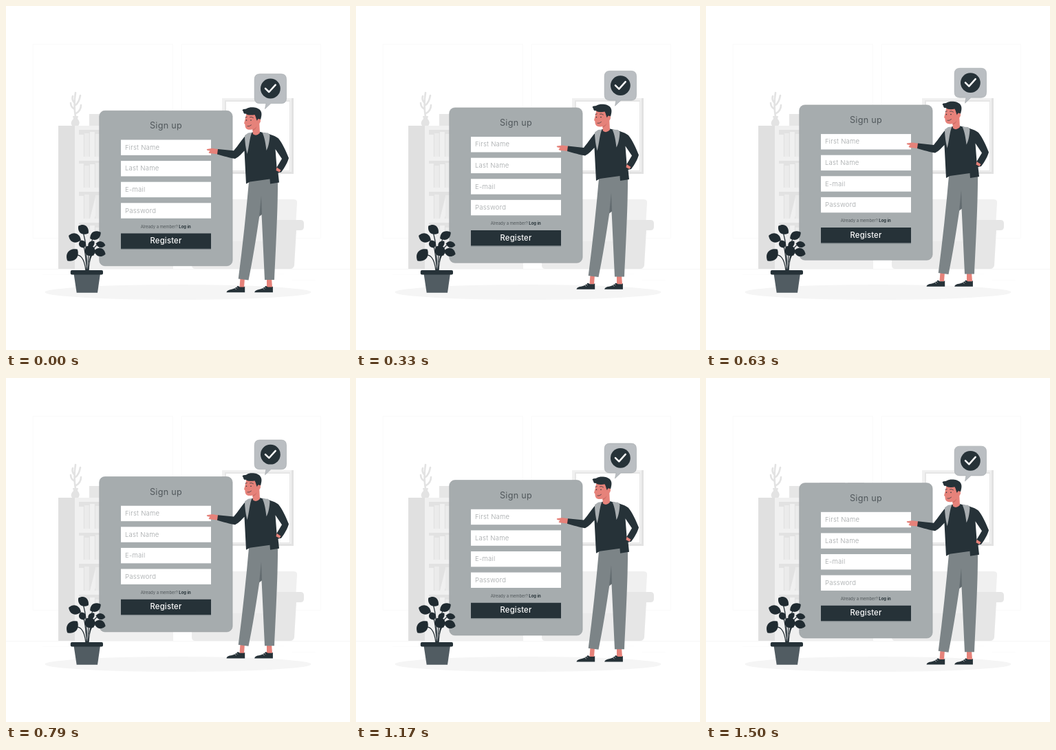
An HTML page that plays this animation: 500x500 px, repeating every 1.54 s.

```html
<!DOCTYPE html>
<html lang="en">
<head>
<meta charset="utf-8">
<title>Sign up</title>
<style>
  html, body { margin: 0; width: 100%; height: 100%; overflow: hidden; background: #fff; }
  svg { display: block; width: 100vw; height: 100vh; }
  text { font-family: Inter, "Open Sans", sans-serif; }
  .dark { fill: #263238; }
  .leaf { fill: #202b31; }
  .skin { fill: #e6827a; }
  .strap { fill: #a9aeb1; }
  .line { fill: none; stroke-linecap: round; stroke-linejoin: round; }
</style>
</head>
<body>
<svg viewBox="0 0 500 500">
  <!-- room -->
  <g class="line" stroke="#fafafa">
    <rect x="39.5" y="55.5" width="203" height="282"/>
    <rect x="255.5" y="55.5" width="202" height="282"/>
    <path stroke="#f3f3f3" stroke-width=".7" d="M0 382.5H500"/>
    <path stroke-width=".6" d="M416 398.5H449M53 390.5H92M396 389.5H404"/>
  </g>

  <g id="shelf">
    <path fill="#e0e0e0" d="M76 174H100V382H76Z"/>
    <path fill="#f0f0f0" d="M100 174H243V382H100Z"/>
    <path fill="#e6e6e6" d="M121 157H137V174H121ZM165 152H202V174H165ZM206 152H230V174H206Z"/>
    <path fill="#e3e3e3" d="M97 160H105L104 164C108 168 107 172 105 174H96C94 171 94 168 98 164Z"/>
    <path class="line" stroke="#e3e3e3" stroke-width="2.6" d="M101 161C99 149 99 138 101 126M100 150C96 148 94 145 94 141M101 144C105 141 107 136 108 130M102 156C107 153 109 148 109 144M99 140C96 137 96 134 97 131"/>
  </g>

  <g>
    <path fill="#e2e2e2" d="M314 134H418V244H314Z"/>
    <path fill="#f0f0f0" d="M314 134H415V241H314Z"/>
    <path fill="#e6e6e6" d="M318 137H413V240H318Z"/>
    <path fill="#fff" d="M320 139H412V239H320Z"/>
  </g>

  <g>
    <path fill="#f0f0f0" d="M283 281H418Q424 281 423 287L418 372H283Z"/>
    <path fill="#ebebeb" d="M270 342H393V382H275Q270 382 270 377Z"/>
    <path fill="#e6e6e6" d="M394 311H428Q433 311 433 316V321Q433 326 428 326H422L419 377Q418 382 413 382H391V326Z"/>
  </g>
  <ellipse cx="250" cy="416" rx="193.5" ry="11" fill="#f5f5f5"/>

  <g id="float">
    <rect x="135.7" y="152.3" width="193.4" height="225.4" rx="8" fill="#a6acae" stroke="#979da0" stroke-width=".6"/>
    <text x="232.5" y="178.3" font-size="12.6" letter-spacing=".3" text-anchor="middle" fill="#51585c">Sign up</text>
    <g id="fields" font-size="9.5" font-weight="300" letter-spacing=".25" fill="#a0a4a6"></g>
    <text x="195.7" y="322.6" font-size="5.9" fill="#50575a">Already a member? <tspan font-weight="700" fill="#263238">Log in</tspan></text>
    <path fill="#7f878a" d="M167 332H298V354H167Z"/>
    <path class="dark" d="M167 330.5H298V352.7H167Z"/>
    <text x="232.5" y="345" font-size="11.2" font-weight="500" letter-spacing=".25" text-anchor="middle" fill="#fff">Register</text>

    <!-- speech bubble -->
    <path fill="#babec2" stroke="#a0a5a8" stroke-width=".6" d="M369 98.8H400Q407.5 98.8 407.5 106.5V134Q407.5 141.6 400 141.6H385L376.5 149.6L378 141.6H369Q361.2 141.6 361.2 134V106.5Q361.2 98.8 369 98.8Z"/>
    <circle class="dark" cx="384.4" cy="120" r="14.4"/>
    <path class="line" stroke="#fff" stroke-width="2.5" d="M377 119.8L382.3 125L391.7 114.6"/>

    <!-- legs and shoes -->
    <path class="skin" d="M340.5 395H347L346 409H339.5ZM379 395H386L387 409H379Z"/>
    <path id="shoe" class="dark" d="M320.5 416.2Q321 413.5 325 412.4C331 411.5 334 409.5 337 406.8L340 408.6H346L347.2 407.5V416.2Z"/>
    <path id="laces" class="line" stroke="#fff" stroke-width=".6" d="M332 409.6L334.5 411.7M334.5 408L336.5 410"/>
    <use href="#shoe" x="40.7"/>
    <use href="#laces" x="40.7"/>
    <path fill="#7c8487" d="M353.5 250H395C395.5 290 392 355 390 398H376L371.5 302L368.5 304C364 335 358 372 352.5 398.5L337.7 396.5Q347 325 353.5 250Z"/>
    <path fill="#626b6f" d="M371 276L368 306L372 303Z"/>

    <!-- arms and jacket -->
    <path class="skin" d="M309 208.2L300 206.8L292 208Q291 209 293 210L296.5 210.5L294.5 213Q295 214.4 298 214.3L309 215.5Z"/>
    <path class="dark" d="M358.5 183.5L350 187C344.5 191 337.5 203 331 210.3L308 208L307 215.5C316 218 326 221 333 222C339 219 343 214 346.5 210.5L349 258.5L354.5 255.5L383.500 251.500L384 258.500L397 256.500L395.500 242.500L400 241.500C405 235 409.500 227 411 221C407 211 401.500 199 396 192.500C390 187.500 377 184.500 369.500 183ZM391.500 208L401 222L393.500 234.500Z"/>
    <path class="skin" d="M393.5 234.500L399.500 238.500L397.500 241.500L392.500 239Z"/>
    <path class="strap" d="M347 188L352 184.500L357.500 183.800C354 191 353.500 205 350.500 215C348.500 207 347 197 347 188Z"/>
    <path class="strap" d="M372.500 184L381 184.500L383.500 188C383 197 381.500 205 378.500 210C377.500 201 376 191 372.500 184Z"/>

    <!-- head -->
    <path class="skin" d="M349.500 156L347.500 165L346 170.500L347.400 172C347.500 178.500 350 181 358.500 179.300L358.800 186Q364 190 369 184.500L368.300 171C371 168 370.500 163.500 368 163.500L362 155Z"/>
    <path fill="#cf6e67" d="M358.500 179.300Q362.500 178 364.500 175Q363 179.500 358.600 181.500Z"/>
    <path class="dark" d="M343.500 151.500C345 149 347 150.500 350 149C354 146 366 146.500 369.500 151.500C372.500 155 371.500 160 370 165L367.500 164Q365.500 164 365 167C363.500 165 363.500 161 361.500 158C357 159 351 159 348.500 156.500C344.500 157.500 346 153.500 343.500 151.500Z"/>
    <path class="line" stroke="#263238" stroke-width=".7" d="M348 162L350.300 161.200M354.500 161.500Q357 160.500 359.500 162.500M351 174.800Q354 175.500 356.500 173"/>
    <circle class="dark" cx="349.500" cy="166" r=".8"/>
    <circle class="dark" cx="356" cy="166" r=".8"/>
  </g>

  <!-- potted plant -->
  <path class="line" stroke="#202b31" stroke-width="1.2" d="M116 385C114 366 108 360 98 362M117 385C118 362 116 342 112 328M119 385C119 360 122 342 130 332M118 385C115 366 116 356 112 346M120 385C121 366 124 358 134 358M121 372C123 358 128 348 136 346"/>
  <g id="leaves" class="leaf"></g>
  <path fill="#515c62" d="M98.5 389H137L133 416.8H102.7Z"/>
  <rect class="dark" x="93.8" y="384" width="47.2" height="6.6" rx="2"/>
</svg>
<script>
  const $ = id => document.getElementById(id);
  const add = (id, markup) => $(id).insertAdjacentHTML('beforeend', markup);

  ['First Name', 'Last Name', 'E-mail', 'Password'].forEach((label, i) => {
    const y = 194.5 + i * 30.6;
    add('fields', `<rect x="167" y="${y}" width="131" height="22.4" fill="#fff"/>
      <text x="173" y="${y + 14.4}">${label}</text>`);
  });

  // Bookshelf compartments, each with a row of books
  for (let row = 0; row < 4; row++) {
    const top = 180 + row * 45;
    add('shelf', `<path fill="#e2e2e2" d="M106 ${top}H237V${top + 39}H106Z"/>`);
    for (let i = 0; i < 16; i++) {
      const height = 32 + (i * 7 + row * 3) % 5;
      const lean = row === 2 && i === 2 ? 8 : 0;
      add('shelf', `<path fill="${i % 2 ? '#ebebeb' : '#f0f0f0'}"
        d="M${106 + i * 8} ${top + 39}h6.8l${lean} ${-height}h-6.8Z"/>`);
    }
  }

  // Leaf: centre, half length, half width, rotation
  const leaves = [
    [112.5, 325, 9, 6.5, 35], [130, 333.5, 9, 6, -30], [100, 337, 9.5, 6.5, 20],
    [111, 346, 6, 5, 65], [137.5, 346.5, 7, 4.5, 10], [96.5, 362, 11, 7.5, -48],
    [122, 356, 8.5, 7.5, 50], [136.5, 358, 8.5, 6, 18], [124, 346, 6, 4, -45]
  ];
  for (const [x, y, a, b, turn] of leaves)
    add('leaves', `<path transform="translate(${x} ${y}) rotate(${turn})"
      d="M${-a} 0C${-a / 2} ${-b * 1.4} ${a / 2} ${-b * 1.3} ${a} 0C${a / 2} ${b * 1.3} ${-a / 2} ${b * 1.4} ${-a} 0Z"/>`);

  const LOOP = 1540, SPEED = 1 / 75;
  function draw(now) {
    const t = now % LOOP;
    const lift = Math.max(0, Math.min((t + 25) * SPEED, (1474 - t) * SPEED));
    $('float').setAttribute('transform', `translate(0 ${0.33 - lift})`);
    requestAnimationFrame(draw);
  }
  draw(performance.now());
</script>
</body>
</html>
```
